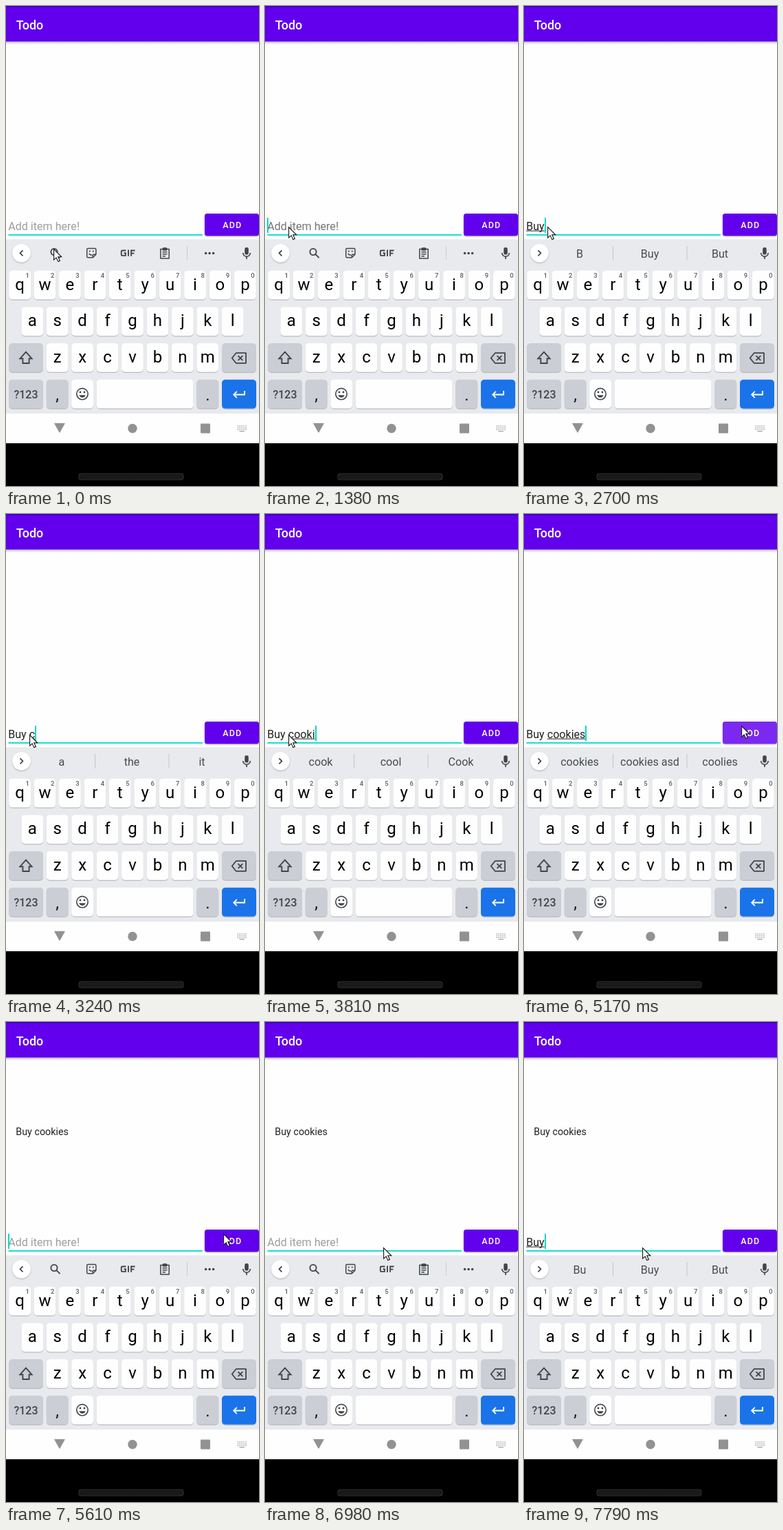
These frames come from a looping animation (368 px wide and 696 px high, 8000 ms). An HTML page with a canvas:

```html
<!DOCTYPE html>
<html lang="en">
<head>
<meta charset="utf-8">
<title>Todo</title>
<style>
html, body { margin: 0; width: 100%; height: 100%; overflow: hidden; background: #000; }
canvas { display: block; width: 368px; height: 696px; }
</style>
</head>
<body>
<canvas id="stage" width="368" height="696"></canvas>
<script>
const ctx = document.getElementById('stage').getContext('2d');
const LOOP = 8000;
const PURPLE = '#6200ee', TEAL = '#03dac5', INK = '#414549', KEY_GREY = '#cbced5';
const FONT = 'Roboto, sans-serif';

// Each entry changes part of the state at the given time.
const timeline = [
  [0, { text: '', caret: false, words: null, item: false, pressed: false, ripple: 0, cursor: [69, 352] }],
  [430, { caret: true }],
  [860, { caret: false }],
  [990, { cursor: [60, 344] }],
  [1120, { cursor: [43, 328] }],
  [1250, { cursor: [34, 320], caret: true }],
  [1380, { pressed: true }],
  [1500, { pressed: false }],
  [1930, { caret: false }],
  [2310, { text: 'B', caret: true }],
  [2440, { words: ['B', 'Buy', 'But'] }],
  [2570, { text: 'Bu' }],
  [2700, { text: 'Buy' }],
  [2850, { words: ['Bu', 'Buy', 'But'] }],
  [2980, { text: 'Buy ', words: ['Buy', 'Buying', 'But'] }],
  [3110, { words: ['a', 'the', 'it'] }],
  [3240, { text: 'Buy c' }],
  [3390, { text: 'Buy co', words: ['c', 'can', 'could'] }],
  [3530, { text: 'Buy coo', words: ['co', 'come', 'could'] }],
  [3670, { text: 'Buy cook', words: ['coo', 'cool', 'cook'] }],
  [3810, { text: 'Buy cooki', words: ['cook', 'cool', 'Cook'] }],
  [3960, { text: 'Buy cookie', words: ['cooki', 'cookie', 'cookies'] }],
  [4240, { text: 'Buy cookies', words: ['cookie', 'cookies', 'cooking'] }],
  [4390, { words: ['cookies', 'cookies asd', 'coolies'] }],
  [4530, { cursor: [162, 311] }],
  [4660, { cursor: [290, 302] }],
  [4780, { cursor: [311, 306] }],
  [4910, { cursor: [316, 307] }],
  [5170, { ripple: 0.16 }],
  [5460, { text: '', item: true, ripple: 0.08 }],
  [5610, { words: null, ripple: 0 }],
  [5870, { caret: false, cursor: [300, 310] }],
  [6000, { cursor: [243, 318] }],
  [6130, { cursor: [190, 325] }],
  [6270, { cursor: [173, 327], caret: true }],
  [6550, { cursor: [172, 327] }],
  [6980, { caret: false }],
  [7250, { text: 'B', caret: true }],
  [7390, { words: ['B', 'Buy', 'But'] }],
  [7520, { text: 'Bu' }],
  [7650, { words: ['Bu', 'Buy', 'But'] }],
  [7790, { text: 'Buy' }]
];

const stateAt = t => Object.assign({}, ...timeline.filter(([at]) => at <= t).map(([, change]) => change));

function rect(x, y, w, h, color) {
  ctx.fillStyle = color;
  ctx.fillRect(x, y, w, h);
}

function rounded(x, y, w, h, r, color) {
  ctx.beginPath();
  ctx.roundRect(x, y, w, h, r);
  ctx.fillStyle = color;
  ctx.fill();
}

function disc(x, y, r, color) {
  ctx.beginPath();
  ctx.arc(x, y, r, 0, Math.PI * 2);
  ctx.fillStyle = color;
  ctx.fill();
}

function label(str, x, y, size, color, { weight = 400, align = 'left', spacing = 0 } = {}) {
  ctx.font = `${weight} ${size}px ${FONT}`;
  ctx.letterSpacing = spacing + 'px';
  ctx.textAlign = align;
  ctx.fillStyle = color;
  ctx.fillText(str, x, y);
}

// SVG path drawn relative to (x, y).
function icon(x, y, d, { fill, stroke, width = 1.8, join = 'miter' } = {}) {
  const path = new Path2D(d);
  ctx.save();
  ctx.translate(x, y);
  ctx.lineJoin = join;
  if (fill) { ctx.fillStyle = fill; ctx.fill(path); }
  if (stroke) { ctx.strokeStyle = stroke; ctx.lineWidth = width; ctx.stroke(path); }
  ctx.restore();
}

function drawApp(s) {
  rect(0, 0, 368, 339, '#fefefe');
  const shade = ctx.createLinearGradient(0, 51, 0, 56);
  shade.addColorStop(0, '#bdbdbd');
  shade.addColorStop(1, '#fefefe');
  rect(0, 51, 368, 5, shade);
  rect(0, 0, 368, 51.5, PURPLE);
  rect(0, 0, 368, 1.5, '#3700b3');
  label('Todo', 14.7, 33.5, 17.9, '#fff', { weight: 500 });
  if (s.item) label('Buy cookies', 14.3, 164, 14.32, '#212121');
  drawField(s);
  drawButton(s.ripple);
}

function drawField({ text, caret, pressed }) {
  const x = 3.2, base = 324.5, size = 16.1;
  rect(3.5, 331, 282.5, 1.8, TEAL);
  if (!text) label('Add item here!', x, base, size, pressed ? '#757575' : '#9e9e9e');
  label(text, x, base, size, '#212121');
  const end = ctx.measureText(text).width;
  const word = text.split(' ').pop();
  const wordWidth = ctx.measureText(word).width;
  if (word) rect(x + end - wordWidth, 325.6, wordWidth, 1, '#212121');
  if (caret) rect(Math.round(x + end), 307, 2, 22, TEAL);
}

function drawButton(ripple) {
  ctx.save();
  ctx.shadowColor = 'rgba(0,0,0,.3)';
  ctx.shadowBlur = 2;
  ctx.shadowOffsetY = 1;
  rounded(289, 301, 79, 32.3, 3.6, PURPLE);
  ctx.restore();
  if (ripple) rounded(289, 301, 79, 32.3, 3.6, `rgba(255,255,255,${ripple})`);
  label('ADD', 315.2, 322, 12.5, '#fff', { weight: 500, spacing: 1.12 });
}

function drawStrip(words) {
  ctx.save();
  ctx.shadowColor = 'rgba(0,0,0,.25)';
  ctx.shadowBlur = 2;
  ctx.shadowOffsetY = 1;
  disc(22.5, 358.3, 13.4, '#fff');
  ctx.restore();
  icon(22.5, 358.3, words ? 'M-2 -4L2 0L-2 4' : 'M2 -4L-2 0L2 4', { stroke: INK, width: 1.7 });
  drawMic();
  if (words) {
    words.forEach((word, i) => label(word, 81 + i * 102, 364.5, 16.1, '#474b50', { align: 'center' }));
    for (const x of [129, 236.5]) rect(x, 348, 1, 21, '#c3c6ca');
  } else {
    drawTools();
  }
}

function drawMic() {
  rounded(347.2, 350, 5.6, 10.5, 2.8, INK);
  icon(350, 358, 'M-5.3 0A5.3 5.3 0 0 0 5.3 0M0 5V9', { stroke: INK, width: 1.7 });
}

function drawTools() {
  const pen = { stroke: INK, width: 1.7 };
  icon(70, 356.5, 'M4.6 0A4.6 4.6 0 1 1 -4.6 0A4.6 4.6 0 1 1 4.6 0M3.3 3.3L8.6 8.6', { stroke: INK, width: 1.9 });
  icon(124.3, 358.2, 'M-5 -6.6H5Q6.6 -6.6 6.6 -5V2L2 6.6H-5Q-6.6 6.6 -6.6 5V-5Q-6.6 -6.6 -5 -6.6ZM6.6 2H3.5Q2 2 2 3.5V6.6M-3.6 .6Q-2 3.5 1 2.6', { ...pen, width: 1.5, join: 'round' });
  disc(121.8, 355.6, 1.1, INK);
  disc(126.8, 355.6, 1.1, INK);
  icon(177.5, 358.2, 'M-3 -3.7H-8Q-9.7 -3.7 -9.7 -2V2Q-9.7 3.7 -8 3.7H-3.6V0H-6M.5 -4.6V4.6M10 -3.7H4.6V4.6M4.6 .4H9', { ...pen, width: 1.9 });
  icon(231, 358.8, 'M-6.2 -6.3H6.2V7.2H-6.2ZM-3.5 -2H3.5M-3.5 1H3.5M-3.5 4H1', { ...pen, width: 1.5, join: 'round' });
  rounded(227.5, 350.3, 7, 4.5, 1.5, INK);
  rect(263, 348, 1, 20, '#c8cbd0');
  for (const x of [290.6, 296.1, 301.6]) disc(x, 358.5, 1.8, INK);
}

function key(x, y, w, color = '#fefefe', shadow = '#b9bcc2') {
  rounded(x, y + 1, w, 42, 5, shadow);
  rounded(x, y, w, 41.8, 5, color);
}

function letterRow(letters, x0, y) {
  [...letters].forEach((letter, i) => {
    const x = x0 + i * 36.42;
    key(x, y, 31.8);
    label(letter, x + 15.9, y + 28, 24, '#000', { align: 'center' });
  });
}

function drawKeys() {
  letterRow('qwertyuiop', 4.2, 383.8);
  [...'1234567890'].forEach((n, i) =>
    label(n, 31.2 + i * 36.42, 394, 9.5, '#5a5e63', { weight: 500, align: 'center' }));
  letterRow('asdfghjkl', 22.4, 436.4);
  letterRow('zxcvbnm', 58.8, 489);

  key(4.2, 489, 49.8, KEY_GREY);
  icon(29, 510, 'M0 -8.3L8.6 1.2H4.6V8H-4.6V1.2H-8.6Z', { stroke: INK, width: 1.9 });
  key(314, 489, 50, KEY_GREY);
  icon(339, 510.5, 'M-4.4 -7.3H10V7.3H-4.4L-10.3 0ZM-1.5 -3.4L5.3 3.4M5.3 -3.4L-1.5 3.4', { stroke: INK, width: 1.8, join: 'round' });

  const y = 541.8;
  key(4.2, y, 49.8, KEY_GREY);
  label('?123', 29, 568.5, 16, INK, { weight: 500, align: 'center' });
  key(58.8, y, 31.8, KEY_GREY);
  label(',', 74.7, 572, 24, '#111', { align: 'center' });
  key(95.2, y, 31.8);
  icon(111, 562.6, 'M8.2 0A8.2 8.2 0 1 1 -8.2 0A8.2 8.2 0 1 1 8.2 0', { stroke: INK, width: 1.6 });
  disc(108, 560, 1.4, INK);
  disc(114, 560, 1.4, INK);
  icon(111, 562.6, 'M-4.6 1.6H4.6A4.8 4.8 0 0 1 -4.6 1.6ZM-2.6 3H2.6Q0 5 -2.6 3Z', { fill: INK });
  key(131.6, y, 141);
  key(277.4, y, 31.8, KEY_GREY);
  label('.', 293.3, 572, 24, '#111', { align: 'center' });
  key(314, y, 50, '#1a73e8', '#9fb7dc');
  icon(339, 563.5, 'M8 -5.5V0H-7.5M-3.2 -4.6L-7.8 0L-3.2 4.6', { stroke: '#fff', width: 1.8 });
}

function drawNavigation() {
  const grey = '#929292';
  rect(0, 591, 368, 43, '#fefefe');
  icon(78, 605.3, 'M-7.3 0H7.3L0 13Z', { fill: grey, stroke: grey, width: 1, join: 'round' });
  disc(184, 612.5, 6.7, grey);
  rounded(283, 605.5, 14, 14, 1, grey);
  for (let row = 0; row < 3; row++)
    for (let col = 0; col < 5; col++)
      rect(336.5 + col * 2.9, 608.3 + row * 2.6, 1.6, 1.4, '#a5a5a5');
  rect(339.4, 616, 7.4, 1.3, '#a5a5a5');
  rect(0, 634, 368, 62, '#000');
  rounded(105.5, 677.5, 153, 10, 4, '#303030');
  rounded(106.5, 678.5, 151, 8, 3.5, '#161616');
  for (let x = 109; x < 256; x += 3) {
    rect(x, 681, 1, 1, '#343434');
    rect(x + 1.5, 684, 1, 1, '#343434');
  }
}

function drawCursor([x, y]) {
  icon(x + 0.6, y + 0.6, 'M0 0V15.5L3.6 12.2L6.2 18L8.8 16.8L6.2 11.2H11.2Z', { fill: '#fff', stroke: '#161616', width: 1.1 });
}

function draw(t) {
  const s = stateAt(t);
  drawApp(s);
  rect(0, 338.3, 368, 253, '#e8eaed');
  drawStrip(s.words);
  drawKeys();
  drawNavigation();
  drawCursor(s.cursor);
}

let start;
function tick(now) {
  start ??= now;
  draw((now - start) % LOOP);
  requestAnimationFrame(tick);
}
requestAnimationFrame(tick);
</script>
</body>
</html>
```
